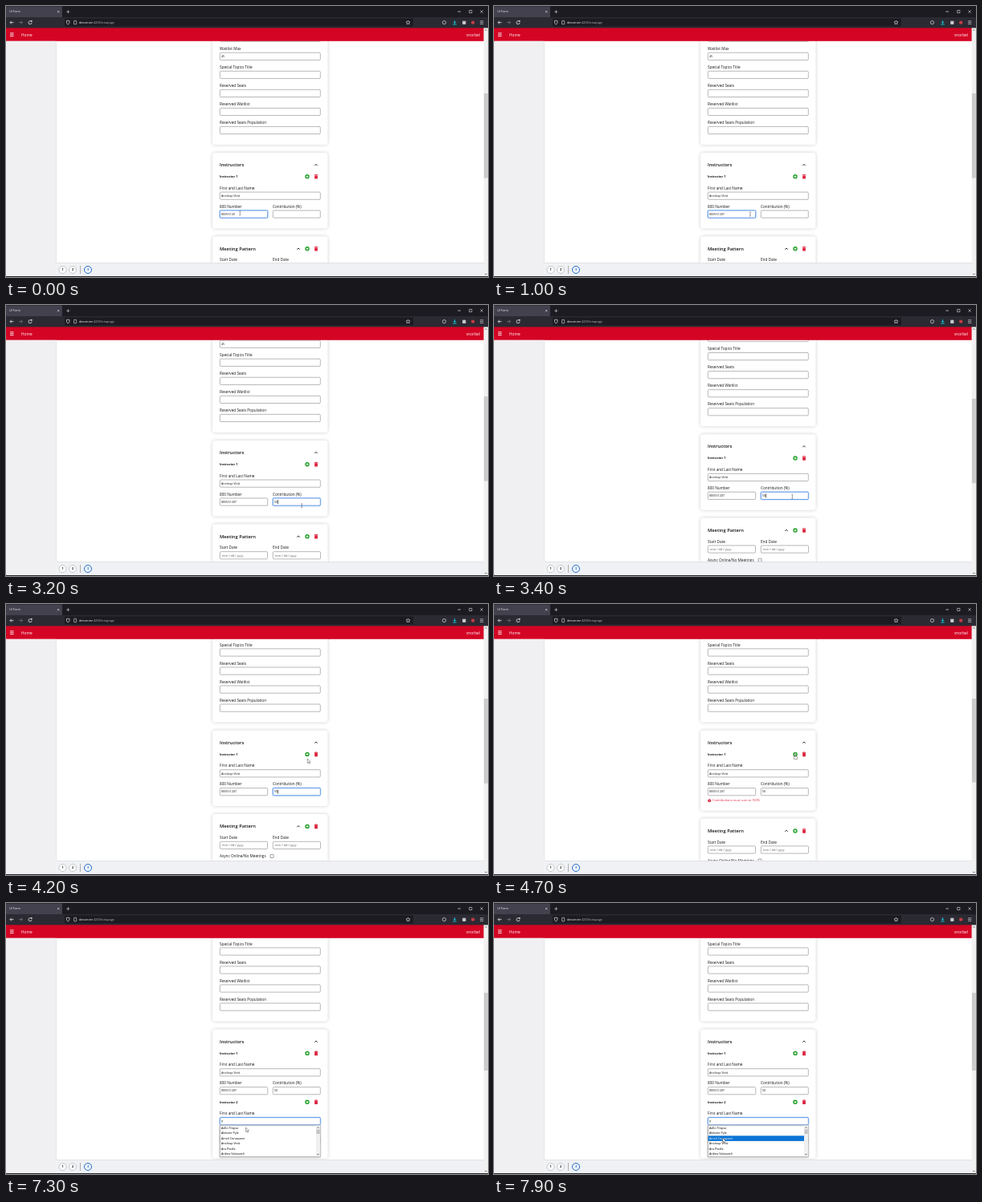
Write an HTML page with a canvas that moves like this. It is 600 px wide and 338 px high and loops after 8000 ms.

```html
<!DOCTYPE html>
<html lang="en">
<head>
<meta charset="utf-8">
<title>Form</title>
<style>
  html, body { margin: 0; width: 100%; height: 100%; overflow: hidden; background: #fff; }
  canvas { display: block; width: 600px; height: 338px; }
</style>
</head>
<body>
<canvas id="stage" width="600" height="338"></canvas>
<script>
const ctx = document.getElementById('stage').getContext('2d');
const LOOP = 8000, STEP = 100;
const SCROLL = 25.4, BLOCK = 60.9;
const INK = '#151517', BLUE = '#3f83e0', RED = '#dc2440', GREEN = '#159a1c';
const PEOPLE = ['Adlin Trepso', 'Aldomir Pyle', 'Ameli Corvapone', 'Anoloup Vesk', 'Ara Pindle', 'Ardina Solpevarli'];
const PERSON = PEOPLE[3];

const mousePath = [
  [0, 291.3, 258.3], [700, 291.3, 258.3], [1500, 365, 261.5], [3000, 365, 261.5],
  [3400, 371.3, 239], [3800, 375.5, 203], [4200, 375.3, 193], [4500, 375, 187.5],
  [4900, 375, 187.5], [5600, 306.8, 271.5], [5700, 306.8, 271.5], [6000, 305, 272],
  [7200, 305, 272], [7300, 298.6, 280], [7500, 291, 291], [7700, 286, 293.5], [7900, 284.6, 293]
];

function mouseAt(t) {
  const i = mousePath.findIndex(p => p[0] > t);
  if (i < 0) return mousePath[mousePath.length - 1].slice(1);
  const [t0, x0, y0] = mousePath[i - 1], [t1, x1, y1] = mousePath[i];
  const k = (t - t0) / (t1 - t0);
  return [x0 + (x1 - x0) * k, y0 + (y1 - y0) * k];
}

function rect(x, y, w, h, color) {
  ctx.fillStyle = color;
  ctx.fillRect(x, y, w, h);
}

function box(x, y, w, h, r, fill, stroke, width = 0.6) {
  ctx.beginPath();
  ctx.roundRect(x, y, w, h, r);
  if (fill) { ctx.fillStyle = fill; ctx.fill(); }
  if (stroke) { ctx.strokeStyle = stroke; ctx.lineWidth = width; ctx.stroke(); }
}

function disc(x, y, r, fill, stroke, width) {
  box(x - r, y - r, 2 * r, 2 * r, r, fill, stroke, width);
}

function line(points, color, width = 0.8) {
  ctx.beginPath();
  points.forEach(([x, y]) => ctx.lineTo(x, y));
  ctx.strokeStyle = color;
  ctx.lineWidth = width;
  ctx.stroke();
}

// y is the vertical middle of the lowercase letters
function text(str, x, y, size = 4.7, color = INK, weight = 400, align = 'left') {
  ctx.font = `${weight} ${size}px "Open Sans", "Noto Sans", sans-serif`;
  ctx.textAlign = align;
  ctx.fillStyle = color;
  ctx.fillText(str, x, y + size * 0.33);
  return ctx.measureText(str).width;
}

function chevron(x, y, color = INK, s = 1.7, dir = 1) {
  line([[x - s, y + s * 0.5 * dir], [x, y - s * 0.5 * dir], [x + s, y + s * 0.5 * dir]], color, 0.9);
}

function plusButton(x, y) {
  disc(x, y, 2.7, GREEN);
  line([[x - 1.5, y], [x + 1.5, y]], '#fff', 1);
  line([[x, y - 1.5], [x, y + 1.5]], '#fff', 1);
}

function trash(x, y) {
  rect(x - 2.3, y - 2.5, 4.6, 0.9, RED);
  rect(x - 0.8, y - 3, 1.6, 0.6, RED);
  box(x - 1.9, y - 1.4, 3.8, 4.2, 0.5, RED);
}

function input(x, y, w, value = '', focus = false, caret = false) {
  if (focus) box(x, y - 4.8, w, 9.6, 1.5, null, '#c9dffa', 1.6);
  box(x + 0.3, y - 4.6, w - 0.6, 9.2, 1.2, '#fff', focus ? BLUE : '#89898d', focus ? 0.8 : 0.6);
  const end = x + 2 + text(value, x + 2, y, 3.7, INK);
  if (focus && caret) rect(end + 0.2, y - 2.5, 0.6, 5, '#000');
}

function field(label, y, value, focus, caret) {
  text(label, 266, y);
  input(266, y + 9.4, 125.6, value, focus, caret);
}

function card(y, h) {
  ctx.save();
  ctx.shadowColor = 'rgba(0,0,0,.2)';
  ctx.shadowBlur = 4;
  box(257, y, 143.5, h, 3.5, '#fff');
  ctx.restore();
}

function instructor(n, y, s) {
  text('Instructor ' + n, 266, y, 3.8, INK, 700);
  plusButton(375, y);
  trash(386, y);
  field('First and Last Name', y + 14.5, s.name, s.focus === 'name', s.caret);
  text('800 Number', 266, y + 37.5);
  input(266, y + 46.8, 60, s.number, s.focus === 'number', s.caret);
  text('Contribution (%)', 332, y + 37.5);
  input(332, y + 46.8, 59.6, s.share, s.focus === 'share', s.caret);
}

function datePicker(label, x, y) {
  text(label, x, y);
  input(x, y + 9.4, 59.8);
  text('mm / dd / yyyy', x + 3, y + 9.4, 3.85, '#5c5c60');
}

function firstState(t) {
  const focus = t < 1500 ? 'number' : t < 4600 ? 'share' : '';
  const caret = focus === 'number' ? t >= 100 && t < 500 : t < 2000 || t >= 2200;
  return {
    name: PERSON, focus, caret,
    number: t < 100 ? '80055120' : '800551207',
    share: t < 2200 ? '' : t < 2400 ? '5' : '50'
  };
}

function page(t) {
  const progress = Math.min(1, Math.max(0, (t - 3000) / 800));
  const scroll = SCROLL * (1 - (1 - progress) ** 2.8);
  const error = t >= 4600, second = t >= 4800;
  const grow = (second ? BLOCK : 0) + (error ? 5.6 : 0);

  rect(0, 43, 600, 295, '#fff');
  ctx.save();
  ctx.beginPath();
  ctx.rect(62, 43, 533, 277.5);
  ctx.clip();
  ctx.translate(0, -scroll);

  card(0, 173);
  input(266, 39.6, 125.6);
  ['Waitlist Max', 'Special Topics Title', 'Reserved Seats', 'Reserved Waitlist', 'Reserved Seats Population']
    .forEach((label, i) => field(label, 53.4 + 23.05 * i, i ? '' : '45'));

  card(183, 94.5 + grow);
  text('Instructors', 266, 198.2, 5.7, '#111', 600);
  chevron(386, 198.2);
  instructor(1, 212.8, firstState(t));
  if (second) {
    instructor(2, 212.8 + BLOCK, {
      name: t >= 6800 ? 'p' : '', number: '', share: '',
      focus: t >= 5800 ? 'name' : '',
      caret: t >= 5900 && t < 6400 || t >= 6800 && t < 7300
    });
  }
  if (error) {
    const y = 270.6 + (second ? BLOCK : 0);
    disc(268.2, y, 2, RED);
    rect(267.9, y - 1.2, 0.6, 1.4, '#fff');
    rect(267.9, y + 0.6, 0.6, 0.6, '#fff');
    text('Contributions must sum to 100%', 272, y, 3.85, RED);
  }

  const y = 287.3 + grow;
  card(y, 150);
  text('Meeting Pattern', 266, y + 15.5, 5.75, '#111', 600);
  chevron(364, y + 15.5);
  plusButton(375, y + 15.5);
  trash(386, y + 15.5);
  datePicker('Start Date', 266, y + 29.6);
  datePicker('End Date', 332, y + 29.6);
  text('Async Online/No Meetings', 266, y + 52.7);
  box(329, y + 50.6, 4, 4, 0.6, '#fff', '#77777b', 0.7);
  ctx.restore();

  if (t >= 6800) suggestions(t >= 7700 ? 2 : -1);
  return { scroll, error, second };
}

function suggestions(active) {
  ctx.save();
  ctx.shadowColor = 'rgba(0,0,0,.3)';
  ctx.shadowBlur = 2;
  ctx.shadowOffsetY = 0.6;
  box(266.4, 277.2, 125, 39.2, 0, '#fff', '#96969a', 0.5);
  ctx.restore();
  PEOPLE.forEach((name, i) => {
    const y = 280.6 + 6.5 * i, on = i === active;
    if (on) rect(266.7, y - 3.3, 119.3, 6.6, '#0a74d6');
    text(name, 268, y, 3.7, on ? '#fff' : '#000');
  });
  rect(386, 277.5, 5.1, 38.6, '#f0f0f0');
  rect(386.3, 282.4, 4.5, 5.6, '#c6c6c8');
  chevron(388.5, 280, '#555', 1.2);
  chevron(388.5, 313.5, '#555', 1.2, -1);
}

function browser() {
  const pale = '#e4e4ea', dim = '#77767f';
  rect(0, 0, 600, 14, '#1c1b22');
  rect(0, 0.5, 70, 13.5, '#42414d');
  text('UI Form', 4, 7.2, 3.8, '#f3f3f6');
  line([[64, 6], [66.4, 8.4]], pale, 0.6);
  line([[66.4, 6], [64, 8.4]], pale, 0.6);
  line([[75.3, 7.2], [79.3, 7.2]], pale, 0.6);
  line([[77.3, 5.2], [77.3, 9.2]], pale, 0.6);
  line([[562.3, 7], [566, 7]], pale, 0.7);
  box(576.7, 5.4, 3.2, 3.2, 0, null, pale, 0.6);
  line([[590.4, 5.3], [593.8, 8.7]], pale, 0.6);
  line([[593.8, 5.3], [590.4, 8.7]], pale, 0.6);

  rect(0, 14, 600, 14, '#2b2a33');
  box(73, 15.6, 434, 10, 1.3, '#1c1b22');
  line([[9.5, 20.6], [5, 20.6]], pale);
  line([[7, 18.6], [5, 20.6], [7, 22.6]], pale);
  line([[16, 20.6], [20.5, 20.6]], dim);
  line([[18.5, 18.6], [20.5, 20.6], [18.5, 22.6]], dim);
  ctx.beginPath();
  ctx.arc(30, 20.7, 2, 0, 5.2);
  ctx.strokeStyle = pale;
  ctx.lineWidth = 0.8;
  ctx.stroke();
  rect(30.8, 18, 1.8, 1.6, pale);
  line([[75.3, 18.6], [77.2, 18], [79.1, 18.6], [78.7, 21.6], [77.2, 23.2], [75.7, 21.6], [75.3, 18.3]], pale, 0.7);
  box(84.6, 18.3, 3, 4.5, 0.4, null, pale, 0.6);
  const w = text('devserver', 91, 20.6, 3.75, '#fff');
  text(':4200/newpage', 91 + w, 20.6, 3.75, '#b4b3bb');

  ctx.beginPath();
  for (let i = 0; i < 10; i++) {
    const r = i % 2 ? 1.2 : 2.7, a = i * Math.PI / 5 - Math.PI / 2;
    ctx.lineTo(500.5 + r * Math.cos(a), 20.7 + r * Math.sin(a));
  }
  ctx.closePath();
  ctx.strokeStyle = pale;
  ctx.lineWidth = 0.6;
  ctx.stroke();
  disc(545.5, 20.6, 2.1, null, pale, 0.7);
  line([[558.5, 18], [558.5, 21.5]], '#19c5dc', 0.9);
  line([[556.8, 20], [558.5, 21.7], [560.2, 20]], '#19c5dc', 0.9);
  line([[556.2, 23], [560.8, 23]], '#19c5dc', 0.9);
  rect(568.2, 18.7, 4.2, 4.2, '#c9c9cf');
  disc(581.2, 20.6, 2.2, '#c23b46');
  [18.8, 20.6, 22.4].forEach(y => line([[590, y], [594.3, y]], pale, 0.6));
}

function appFrame({ scroll, error, second }) {
  rect(0, 27.4, 595, 16.4, '#d40524');
  [33.8, 35.7, 37.6].forEach(y => line([[5, y], [9.6, y]], '#fff', 0.8));
  text('Home', 19, 36, 4.8, '#fff');
  text('vnorbel', 590, 36, 4.8, '#fff', 400, 'right');

  rect(0, 43.8, 62.5, 293.2, '#f0f0f2');
  rect(62.2, 43.8, 0.6, 276.4, '#dcdce0');
  rect(62.5, 320.4, 532.5, 16.6, '#eff1f4');
  rect(62.5, 320, 532.5, 0.7, '#dadce0');
  [70.5, 83, 102].forEach((x, i) => {
    const last = i === 2;
    disc(x, 329, 4.5, last ? '#f1f6fd' : '#fff', last ? '#1f6bca' : '#a4a6ab', last ? 1 : 0.6);
    text(String(i + 1), x, 329, 3.8, last ? '#1764c4' : INK, 700, 'center');
  });
  rect(92.3, 324, 0.7, 10, '#8e9095');

  rect(594.6, 27.4, 5.4, 310, '#f0f0f0');
  const top = second ? 112 : 109 + scroll * 0.36;
  rect(595, top, 4.8, second ? 97 : error ? 104.3 : 105.5, '#cbcbcd');
  chevron(597.4, 30, '#555', 1.2);
  chevron(597.4, 334.5, '#555', 1.2, -1);
  rect(0, 337, 600, 1, '#25262a');
}

function arrow(x, y) {
  ctx.beginPath();
  [[0, 0], [0, 5.4], [1.2, 4.3], [2.1, 6.2], [3, 5.8], [2.2, 4], [3.8, 3.9]]
    .forEach(([dx, dy]) => ctx.lineTo(x + dx, y + dy));
  ctx.closePath();
  ctx.fillStyle = '#fff';
  ctx.fill();
  ctx.strokeStyle = '#333';
  ctx.lineWidth = 0.45;
  ctx.stroke();
}

function hand(x, y) {
  box(x - 0.7, y, 1.4, 4, 0.7, '#fff', '#222', 0.45);
  box(x - 1.6, y + 2.6, 4.2, 3.6, 1, '#fff', '#222', 0.45);
}

function iBeam(x, y) {
  line([[x, y - 2.4], [x, y + 2.4]], '#333', 0.5);
  line([[x - 0.9, y - 2.5], [x + 0.9, y - 2.5]], '#333', 0.4);
  line([[x - 0.9, y + 2.5], [x + 0.9, y + 2.5]], '#333', 0.4);
}

function pointer(t) {
  if (t >= 100 && t < 700) return;
  const [x, y] = mouseAt(t);
  if (t >= 4400 && t < 5000) hand(x, y);
  else if (t >= 3500 && t < 5500 || t >= 7300) arrow(x, y);
  else iBeam(x, y);
}

function draw(now) {
  const t = Math.floor(now % LOOP / STEP) * STEP;
  const state = page(t);
  browser();
  appFrame(state);
  pointer(t);
  requestAnimationFrame(draw);
}
requestAnimationFrame(draw);
</script>
</body>
</html>
```
